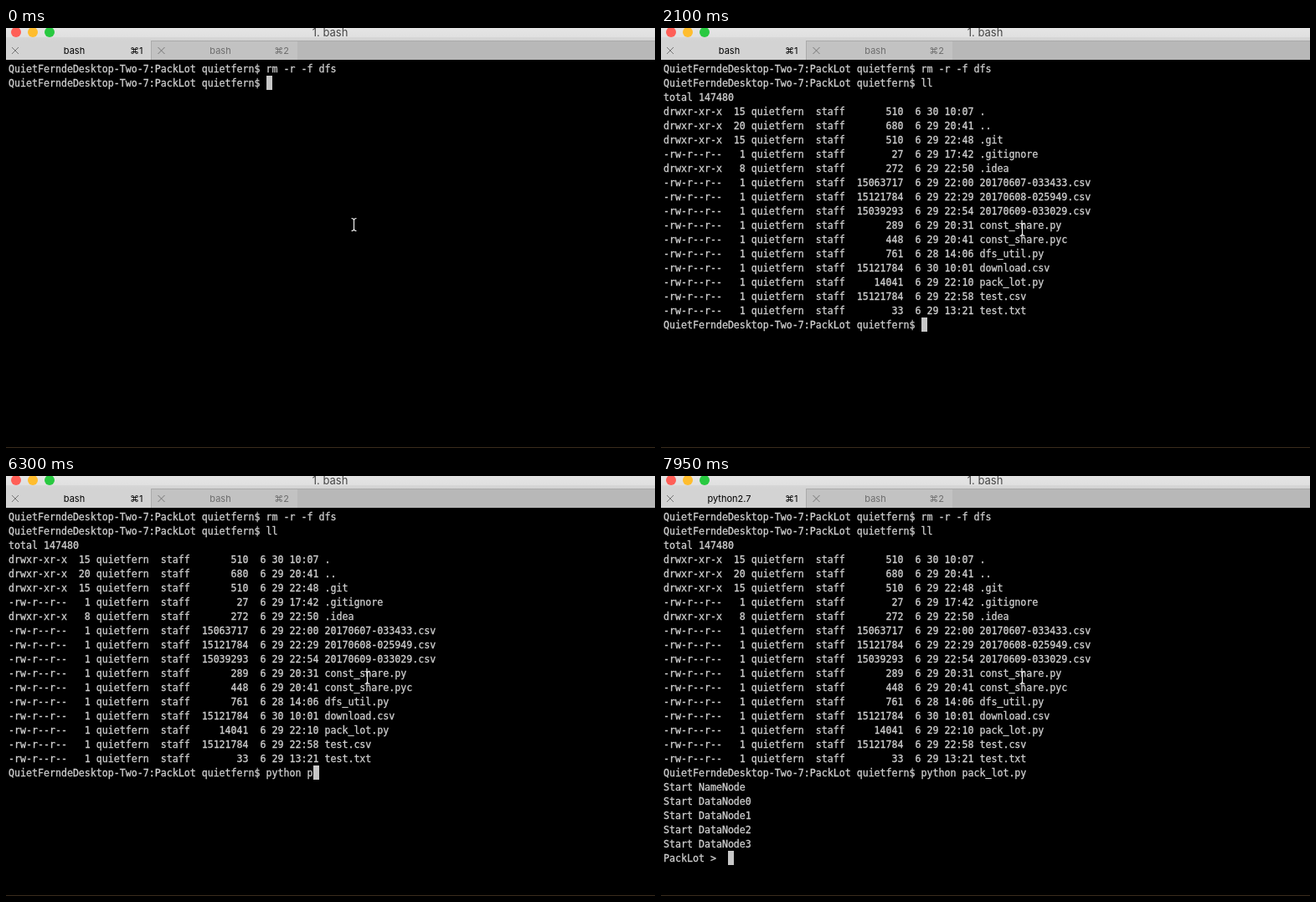
An HTML page with a canvas that plays this animation: 775 px wide and 502 px high, repeating every 8 s.

```html
<!DOCTYPE html>
<html lang="en">
<head>
<meta charset="utf-8">
<title>Terminal session</title>
<style>
  html, body { margin: 0; width: 100%; height: 100%; overflow: hidden; background: #000; }
  canvas { display: block; }
</style>
</head>
<body>
<canvas id="stage" width="775" height="502"></canvas>
<script>
const ctx = document.getElementById('stage').getContext('2d');
const LOOP = 8000, CELL = 7, ROW = 17, LEFT = 3, TOP = 40;
const MONO = '11.628px "DejaVu Sans Mono", monospace';
const UI = 'Inter, sans-serif';
const USER = 'quietfern';
const PROMPT = `QuietFerndeDesktop-Two-7:PackLot ${USER}$ `;

// links, size, day, time, name
const listing = `15 510 30 10:07 .
20 680 29 20:41 ..
15 510 29 22:48 .git
1 27 29 17:42 .gitignore
8 272 29 22:50 .idea
1 15063717 29 22:00 20170607-033433.csv
1 15121784 29 22:29 20170608-025949.csv
1 15039293 29 22:54 20170609-033029.csv
1 289 29 20:31 const_share.py
1 448 29 20:41 const_share.pyc
1 761 28 14:06 dfs_util.py
1 15121784 30 10:01 download.csv
1 14041 29 22:10 pack_lot.py
1 15121784 29 22:58 test.csv
1 33 29 13:21 test.txt`.split('\n').map(entry => {
  const [links, size, day, time, name] = entry.split(' ');
  const mode = links > 1 ? 'drwxr-xr-x' : '-rw-r--r--';
  return `${mode}${links.padStart(4)} ${USER}  staff${size.padStart(10)}  6 ${day} ${time} ${name}`;
});
const startup = ['NameNode', ...[0, 1, 2, 3].map(i => 'DataNode' + i)].map(n => 'Start ' + n);

// Each step is [start time, value]
const listKeys = [[0, 0], [1350, 1], [1500, 2]];
const runKeys = [[0, 0], [3600, 1], [3900, 2], [4050, 4], [4200, 5], [4350, 6],
                 [4650, 7], [6300, 8], [6450, 10], [6600, 11], [6750, 19]];
const pointer = [[0, [415.5, 235]], [300, [416.5, 295]], [450, [413.5, 312]], [600, [431.5, 241]]];
const at = (steps, t) => steps.filter(([start]) => start <= t).pop()[1];

function screenLines(t) {
  const lines = [PROMPT + 'rm -r -f dfs', PROMPT + 'll'.slice(0, at(listKeys, t))];
  if (t >= 2100) {
    lines.push('total 147480', ...listing, PROMPT + 'python pack_lot.py '.slice(0, at(runKeys, t)));
  }
  if (t >= 7200) lines.push(...startup, 'PackLot >  ');
  return lines;
}

function rect(x, y, w, h, color) {
  ctx.fillStyle = color;
  ctx.fillRect(x, y, w, h);
}

function label(text, x, y, color, size = 11, align = 'center') {
  ctx.font = `${size}px ${UI}`;
  ctx.textAlign = align;
  ctx.fillStyle = color;
  ctx.fillText(text, x, y);
}

function stroke(path, color, width = 1) {
  ctx.strokeStyle = color;
  ctx.lineWidth = width;
  ctx.stroke(new Path2D(path));
}

function drawTab(x, title, key, color) {
  stroke(`M${x + 7} 23l8 8m0-8l-8 8`, '#777');
  label(title, x + 81.5, 31, color);
  label(key, x + 163.5, 31, color, 11, 'right');
}

function drawChrome(t) {
  const bar = ctx.createLinearGradient(0, 0, 0, 15);
  bar.addColorStop(0, '#e5e5e5');
  bar.addColorStop(0.72, '#e0e0e0');
  bar.addColorStop(0.76, '#d6d6d6');
  bar.addColorStop(1, '#d3d3d3');
  rect(0, 0, 775, 15, bar);
  rect(0, 15, 775, 23, '#b8b8b8');
  rect(0, 15, 173, 23, '#d3d3d3');
  rect(174, 15, 174, 23, '#c2c2c2');
  rect(173, 15, 1, 23, '#aaa');
  rect(173, 15, 602, 1, '#aaa');
  ['#ff5f57', '#ffbd2e', '#28c940'].forEach((color, i) => {
    ctx.fillStyle = color;
    ctx.beginPath();
    ctx.arc(12 + i * 20, 5, 6, 0, 7);
    ctx.fill();
  });
  label('1. bash', 387, 10, '#444', 13);
  drawTab(0, t < 7950 ? 'bash' : 'python2.7', '⌘1', '#000');
  drawTab(174.5, 'bash', '⌘2', '#6c6c6c');
}

function drawTerminal(t) {
  const lines = screenLines(t);
  ctx.font = MONO;
  ctx.textAlign = 'left';
  ctx.fillStyle = ctx.strokeStyle = '#cfcfcf';
  ctx.lineWidth = 0.3; // thickens the thin glyphs
  lines.forEach((line, i) => {
    const y = TOP + 13 + i * ROW;
    ctx.fillText(line, LEFT, y);
    ctx.strokeText(line, LEFT, y);
  });
  const last = lines.length - 1;
  rect(LEFT + lines[last].length * CELL, TOP + last * ROW, CELL, ROW, '#c7c7c7');
  rect(0, 501, 775, 1, '#3a2c1c');
}

function drawPointer([x, y]) {
  stroke(`M${x - 3} ${y - 7.5}q3 0 3 2.5v10q0 2.5-3 2.5M${x + 3} ${y - 7.5}q-3 0-3 2.5v10q0 2.5 3 2.5`, '#eee', 1.2);
}

function frame() {
  const t = performance.now() % LOOP;
  rect(0, 0, 775, 502, '#000');
  drawChrome(t);
  drawTerminal(t);
  drawPointer(at(pointer, t));
  requestAnimationFrame(frame);
}
frame();
</script>
</body>
</html>
```
